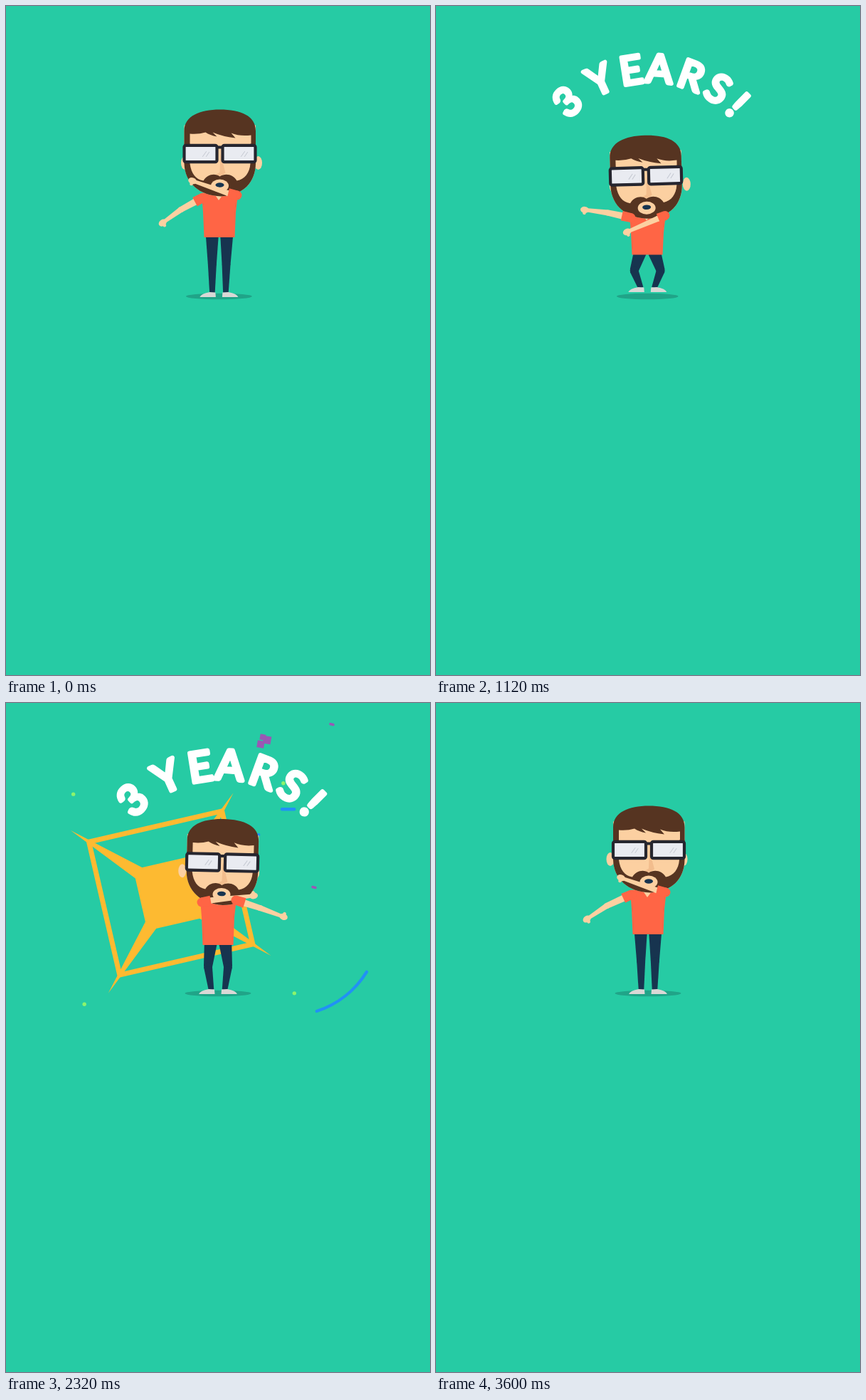
Recreate the animation shown at these times as an HTML page with a canvas. Size 596 px wide and 940 px high, loop 3640 ms.

```html
<!DOCTYPE html>
<html lang="en">
<head>
<meta charset="utf-8">
<title>3 years</title>
<style>
  html, body { margin: 0; width: 100%; height: 100%; overflow: hidden; background: #26cba4; }
  canvas { display: block; }
</style>
</head>
<body>
<canvas id="stage" width="596" height="940"></canvas>
<script>
const ctx = document.getElementById('stage').getContext('2d');
const LOOP = 3640, STEP = 40, TAU = Math.PI * 2, DEG = Math.PI / 180;
const BG = '#26cba4', SKIN = '#fcd0a1', SHADE = '#f2bd8d', HAIR = '#563421', SHIRT = '#ff6545',
  NAVY = '#17344f', FRAME = '#26262f', PURPLE = '#9a58b4', YELLOW = '#fdba31',
  GREEN = '#8cf46c', RED = '#e0522a', BLUE = '#2191f5';

const clamp = v => Math.max(0, Math.min(1, v));
const mix = (a, b, u) => a + (b - a) * u;
const out = u => 1 - (1 - clamp(u)) ** 2;
const polar = (r, deg) => [r * Math.cos(deg * DEG), r * Math.sin(deg * DEG)];

function at(x, y, deg, draw) {
  ctx.save();
  ctx.translate(x, y);
  ctx.rotate(deg * DEG);
  draw();
  ctx.restore();
}
function poly(points, fill) {
  ctx.beginPath();
  points.forEach(p => ctx.lineTo(...p));
  ctx.closePath();
  if (fill) { ctx.fillStyle = fill; ctx.fill(); }
}
function dot(x, y, rx, fill, ry = rx) {
  if (rx <= 0) return;
  ctx.beginPath();
  ctx.ellipse(x, y, rx, ry, 0, 0, TAU);
  ctx.fillStyle = fill;
  ctx.fill();
}
function line(x1, y1, x2, y2, width, color) {
  if (width <= 0) return;
  ctx.beginPath();
  ctx.moveTo(x1, y1);
  ctx.lineTo(x2, y2);
  ctx.lineWidth = width;
  ctx.strokeStyle = color;
  ctx.stroke();
}
function ray(r1, r2, deg, width, color) {
  line(...polar(r1, deg), ...polar(r2, deg), width, color);
}
function arc(r, from, to, width, color) {
  if (width <= 0) return;
  ctx.beginPath();
  ctx.arc(0, 0, r, from * DEG, to * DEG);
  ctx.lineWidth = width;
  ctx.strokeStyle = color;
  ctx.stroke();
}

/* Bursts: s is the size, equal to 1 at the peak; w thins out after it. */
function burst(t, start, peak, end, x, y, draw) {
  if (t <= start || t >= end) return;
  const size = v => out((v - start) / (end - start));
  const s = size(t) / size(peak);
  const w = t < peak ? 1 : 1 - (t - peak) / (end - peak);
  at(x, y, 0, () => draw(s, w, (t - peak) / 1000));
}
function ring(s, r, angles, size, color) {
  angles.forEach(a => dot(...polar(r * s, a), size, color));
}

function octagon(s, w) {
  const shape = k => {
    const a = 67.5 * k, b = 28 * k;
    poly([[-b, -a], [b, -a], [a, -b], [a, b], [b, a], [-b, a], [-a, b], [-a, -b]]);
    ctx.stroke();
  };
  ctx.lineJoin = 'miter';
  ctx.globalAlpha = .4 * w;
  ctx.lineWidth = 8;
  ctx.strokeStyle = '#6f9db5';
  shape(s * 1.27);
  ctx.globalAlpha = 1;
  ctx.lineWidth = 6 * w;
  ctx.strokeStyle = PURPLE;
  shape(s);
  for (let a = 0; a < 360; a += 90) {
    ray(46 * s, 55 * s, a, 6 * w, PURPLE);
    ray(76 * s, 108 * s, a + 45, 5 * w, PURPLE);
  }
}
function sun(s, w, dt) {
  ctx.rotate((-21 - dt * 60) * DEG);
  const a = 62 * s, hole = a * mix(1, .24, w);
  ctx.beginPath();
  ctx.rect(-a, -a, a * 2, a * 2);
  ctx.rect(-hole, -hole, hole * 2, hole * 2);
  ctx.fillStyle = YELLOW;
  ctx.fill('evenodd');
  ctx.lineCap = 'butt';
  for (let d = 0; d < 360; d += 90) ray(65 * s, 106 * s, d, 12 * w, YELLOW);
  ctx.lineCap = 'round';
}
function spikes(s, w, dt) {
  ctx.rotate((-13 + dt * 40) * DEG);
  const a = 96 * s, b = 44 * s * w;
  ctx.lineJoin = 'miter';
  ctx.lineWidth = 7 * w;
  ctx.strokeStyle = YELLOW;
  ctx.strokeRect(-a, -a, a * 2, a * 2);
  ctx.fillStyle = YELLOW;
  ctx.fillRect(-b, -b, b * 2, b * 2);
  for (let d = 45; d < 360; d += 90)
    at(0, 0, d, () => poly([[53 * s, -9 * w], [166 * s, 0], [53 * s, 9 * w]], YELLOW));
}

function bursts(t) {
  ctx.lineCap = 'round';
  burst(t, 600, 760, 1080, 399, 295, octagon);
  burst(t, 600, 760, 1080, 340, 125, (s, w) =>
    [[-132, -101], [135, -63], [119, 48], [30, 115]]
      .forEach(p => dot(p[0] * s, p[1] * s, 3.2 * w, '#eab42f')));

  burst(t, 1200, 1480, 1720, 159, 86, (s, w) => {
    for (let a = 13.3; a < 373; a += 22.5) ray(131 * s, 136 * s, a, 5.5 * w, GREEN);
  });
  burst(t, 1200, 1480, 1720, 238, 264, (s, w) => ring(s, 152, [-1, 45, 92, 225], 2.8 * w, BLUE));
  burst(t, 1320, 1480, 1680, 404, 142, (s, w) => ring(s, 93, [0, 90, 180, 270], 2.1 * w, '#e64d25'));
  burst(t, 1240, 1480, 1720, 148, 233, sun);

  burst(t, 1440, 1920, 2240, 445.5, 144, (s, w, dt) => {
    const half = 46 * Math.min(1, s), mid = -64 + dt * 55;
    [mid, mid + 180].forEach(m => arc(85.5 * s, m - half, m + half, 4 * w, PURPLE));
  });
  burst(t, 1680, 1920, 2200, 177, 110, (s, w) => {
    for (let i = 0; i < 8; i++) {
      const a = i * 45 - 3.3;
      if (i % 2) ray(34 * s, 79 * s, a, 4.5 * w, RED);
      else ray(41 * s, 116 * s, a, 4.5 * w, RED);
    }
  });
  burst(t, 1480, 1920, 2480, 396, 309, (s, w, dt) => {
    const mid = 25 + dt * 67, half = 32 - dt * 30;
    [mid, mid + 180].forEach(m => arc(92 * s, m - half, m + half, 5 * Math.min(1, w * 3), BLUE));
    const r = 31 + dt * 322, d = -67 - dt * 57;
    if (r > 0) [d, d + 180].forEach(m => at(...polar(r, m), m + 90, () => {
      const h = 3 + Math.max(0, dt) * 14;
      line(-h, 0, h, 0, 4.5, BLUE);
    }));
  });

  burst(t, 2120, 2320, 2720, 231.7, 267, spikes);
  burst(t, 2080, 2320, 2640, 250, 268, (s, w) => ring(s, 209, [42, 132, 222, 312], 2.7 * w, GREEN));
  burst(t, 2160, 2320, 2560, 400, 130, (s, w) => {
    ctx.fillStyle = PURPLE;
    [[-42, -72, 10], [-33, -78, 11], [-39, -82, 8]].forEach(([x, y, h]) =>
      at(x * s, y * s, 10, () => ctx.fillRect(-h * w / 2, -h * w / 2, h * w, h * w)));
    [[58, -100], [33, 129]].forEach(([x, y]) =>
      line(x * s - 2, y * s - .5, x * s + 2, y * s + .5, 3.5 * w, PURPLE));
  });

  burst(t, 2680, 2880, 3240, 208, 316, (s, w) => {
    for (let i = 0; i < 16; i++) {
      const far = i % 2 ? 12 : 0;
      ray((81 + far) * s, (111 + far) * s, 5 + i * 22.5, 4.8 * w, RED);
    }
  });
  burst(t, 2680, 2880, 3200, 213, 309, (s, w) => {
    ring(s, 55, [-15, 74, 154, 247], 3.8 * w, BLUE);
    ring(s, 116, [32, 114, 200, 294], 1.8 * w, BLUE);
  });
}

/* Lettering on an arc */
const LETTERS = [['3', -43], ['Y', -24.5], ['E', -9], ['A', 4], ['R', 20], ['S', 33], ['!', 45]];
function lettering(t) {
  if (t >= 3600) return;
  const zoom = 1 + (t - 760) / 2120 * .105, leave = clamp((t - 3360) / 240);
  ctx.font = '54px Lato, sans-serif';
  ctx.lineJoin = 'round';
  ctx.lineWidth = 5.5;
  ctx.fillStyle = ctx.strokeStyle = '#fff';
  LETTERS.forEach(([char, deg], i) => {
    const u = clamp((t - 160 - i * 60) / 200);
    if (!u) return;
    const v = u - 1, pop = 1 + 2.7 * v ** 3 + 1.7 * v * v;
    const [px, py] = polar(170, deg - 90);
    let x = 300 + (2 + px) * zoom, y = 106 + (152 + py) * zoom - 60 * (1 - pop);
    x = 300 + (x - 300) * (1 + leave * 1.6);
    y = 230 + (y - 230) * (1 + leave * 1.6);
    at(x, y, deg, () => {
      const k = Math.max(0, pop) * zoom * (1 - leave);
      const ink = ctx.measureText(char);
      const left = (ink.actualBoundingBoxLeft - ink.actualBoundingBoxRight) / 2;
      ctx.scale(k, k);
      ctx.fillText(char, left, 19.5);
      ctx.strokeText(char, left, 19.5);
    });
  });
}

/* time, body x, shoulder, hip, face x, face y, hair top, tilt, ear shift, lift,
   then elbow and hand for the left and the right arm */
const POSES = [
  [0, 300, 262, 325, 300.5, 207.5, -62, 0, 2, 0, 246, 286, 221, 304, 312, 263, 263, 246],
  [760, 298, 266, 329, 298, 213.5, -63, 0, 4, 0, 243, 276, 208, 279, 313, 270, 260, 271],
  [1480, 296, 287, 342, 292, 236, -51, -3, 6, 14, 240, 277, 212, 266, 312, 299, 279, 335],
  [1920, 299, 281, 345, 304, 237, -57, 2, -4, 0, 291, 286, 344, 281, 358, 297, 390, 309],
  [2320, 298, 273, 340, 304, 224, -61, 1.3, -5, 0, 291, 277, 347, 271, 357, 288, 389, 300],
  [2880, 299, 284, 343, 300, 234.5, -57, 0, 0, 0, 293, 297, 332, 335, 358, 275, 387, 262],
  [3600, 298, 262, 325, 299, 206.5, -62, 0, -3, 0, 240, 285, 213, 303, 310, 263, 261, 246]
];
const BOBBING = [2, 3, 5, 11, 13, 15, 17];
function poseAt(t) {
  let i = 0;
  while (i < POSES.length - 2 && t >= POSES[i + 1][0]) i++;
  const a = POSES[i], b = POSES[i + 1], u = clamp((t - a[0]) / (b[0] - a[0]));
  const e = (1 - Math.cos(u * Math.PI)) / 2;
  const pose = a.map((v, k) => mix(v, b[k], e));
  if (b[0] - a[0] > 600) BOBBING.forEach(k => pose[k] += 14 * Math.sin(u * Math.PI) ** 2);
  return pose;
}

function limb([x1, y1], [x2, y2], w1, w2, color) {
  const d = Math.hypot(x2 - x1, y2 - y1) || 1, nx = (y1 - y2) / d / 2, ny = (x2 - x1) / d / 2;
  poly([[x1 + nx * w1, y1 + ny * w1], [x2 + nx * w2, y2 + ny * w2],
    [x2 - nx * w2, y2 - ny * w2], [x1 - nx * w1, y1 - ny * w1]], color);
}
function arm(shoulder, elbow, hand) {
  const [sx, sy] = shoulder, [ex, ey] = elbow, [hx, hy] = hand;
  limb(shoulder, elbow, 10, 8, SKIN);
  dot(ex, ey, 4, SKIN);
  limb(elbow, hand, 8, 5, SKIN);
  at(hx, hy, Math.atan2(hy - ey, hx - ex) / DEG, () => {
    dot(1, 0, 6, SKIN, 4.5);
    dot(1, -4, 2.3, SKIN, 2.8);
  });
  const d = Math.hypot(ex - sx, ey - sy) || 1, k = Math.min(1, 13 / d);
  dot(sx, sy, 6.5, SHIRT);
  limb(shoulder, [mix(sx, ex, k), mix(sy, ey, k)], 13, 14, SHIRT);
}

function head(x, y, top, tilt, ear) {
  at(x, y, tilt, () => {
    [-51, 52].forEach(ex => dot(ex + ear, 13, 5.5, SKIN, 9.5));

    const jaw = () => {
      ctx.lineTo(50.5, 14);
      ctx.bezierCurveTo(50, 40, 33, 59, 2, 60);
      ctx.bezierCurveTo(-29, 59, -49, 41, -50, 14);
    };
    ctx.beginPath();
    ctx.moveTo(-50, top + 22);
    ctx.lineTo(50.5, top + 22);
    jaw();
    ctx.fillStyle = SKIN;
    ctx.fill();
    poly([[1, 0], [8, 27], [2, 31], [-6, 30], [0, 26]], SHADE);

    ctx.beginPath();
    ctx.moveTo(50.5, -14);
    jaw();
    ctx.lineTo(-50, -14);
    ctx.lineTo(-42, -14);
    ctx.lineTo(-42, 14);
    ctx.bezierCurveTo(-40, 28, -34, 36, -23, 38);
    ctx.bezierCurveTo(-18, 29, -7, 27, 0, 32);
    ctx.bezierCurveTo(8, 27, 19, 29, 24, 38);
    ctx.bezierCurveTo(35, 36, 42, 27, 43, 14);
    ctx.lineTo(43, -14);
    ctx.fillStyle = HAIR;
    ctx.fill();
    dot(0, 45, 12.5, SKIN, 9);
    dot(0, 44, 6, NAVY, 3.3);

    ctx.beginPath();
    ctx.moveTo(-50, -10);
    ctx.lineTo(-50, top + 30);
    ctx.bezierCurveTo(-50, top + 9, -28, top, 0, top);
    ctx.bezierCurveTo(30, top, 50.5, top + 9, 50.5, top + 30);
    ctx.lineTo(50.5, -10);
    ctx.lineTo(44, -10);
    ctx.lineTo(44, top + 36);
    ctx.quadraticCurveTo(28, top + 38, 16, top + 33);
    ctx.lineTo(22, top + 40);
    ctx.quadraticCurveTo(4, top + 38, -10, top + 32);
    ctx.lineTo(-4, top + 38);
    ctx.quadraticCurveTo(-14, top + 36, -20, top + 32);
    ctx.quadraticCurveTo(-30, top + 35, -42, top + 34);
    ctx.lineTo(-42, -10);
    ctx.fillStyle = HAIR;
    ctx.fill();

    ctx.lineJoin = 'round';
    line(-4, -9, 4, -9, 4, FRAME);
    [-27, 27].forEach(cx => {
      ctx.beginPath();
      ctx.roundRect(cx - 23, -11.7, 46, 23.4, 2.5);
      ctx.fillStyle = '#e9ebf1';
      ctx.fill();
      ctx.lineWidth = 4.2;
      ctx.strokeStyle = FRAME;
      ctx.stroke();
      line(cx + 3, 4, cx + 8, -3, 1, '#c3c7d0');
      line(cx + 8, 4, cx + 12, -2, 1, '#c3c7d0');
    });
  });
}

function dancer(t) {
  const [, cx, sh, hip, fx, fy, top, tilt, ear, lift, ...j] = poseAt(t);
  const foot = mix(298, cx, .7), ground = 403 - lift;
  const bend = Math.max(0, 78 - (ground - hip)) * .28;
  dot(foot, 408, 46.5 - lift * .45, '#20a488', 4.3);

  [-1, 1].forEach(side => {
    const ankle = [foot + side * 9.5, ground], top = [cx + side * 10.2, hip - 3];
    const knee = [(ankle[0] + top[0]) / 2 + side * bend, (ground + hip) / 2 - 1];
    limb(top, knee, 18, 12, NAVY);
    dot(...knee, 5.8, NAVY);
    limb(knee, ankle, 12, 7.5, NAVY);
    ctx.save();
    ctx.translate(foot, ground);
    ctx.scale(side, 1);
    ctx.beginPath();
    ctx.moveTo(4.5, 6);
    ctx.lineTo(5, -.5);
    ctx.lineTo(13, -1);
    ctx.quadraticCurveTo(25, 1, 27, 6);
    ctx.fillStyle = '#d9d8d6';
    ctx.fill();
    ctx.restore();
  });

  poly([[cx - 25, sh + 2], [cx - 12, sh - 2], [cx + 13, sh - 2], [cx + 26, sh + 2],
    [cx + 23, sh + 28], [cx + 21.5, hip], [cx - 21.5, hip], [cx - 23, sh + 28]], SHIRT);
  poly([[cx - 10, sh - 2], [cx + 9, sh - 2], [cx - 1, sh + 11]], SKIN);
  head(fx, fy, top, tilt, ear);
  arm([cx - 23, sh + 7], [j[0], j[1]], [j[2], j[3]]);
  arm([cx + 25, sh + 4], [j[4], j[5]], [j[6], j[7]]);
}

function render(t) {
  ctx.fillStyle = BG;
  ctx.fillRect(0, 0, 596, 940);
  ctx.save();
  ctx.beginPath();
  ctx.rect(0, 0, 596, 454);
  ctx.clip();
  bursts(t);
  lettering(t);
  dancer(t);
  ctx.restore();
}

const began = performance.now();
function tick() {
  const t = (performance.now() - began) % LOOP;
  render(Math.floor(t / STEP) * STEP);
  requestAnimationFrame(tick);
}
tick();
</script>
</body>
</html>
```
